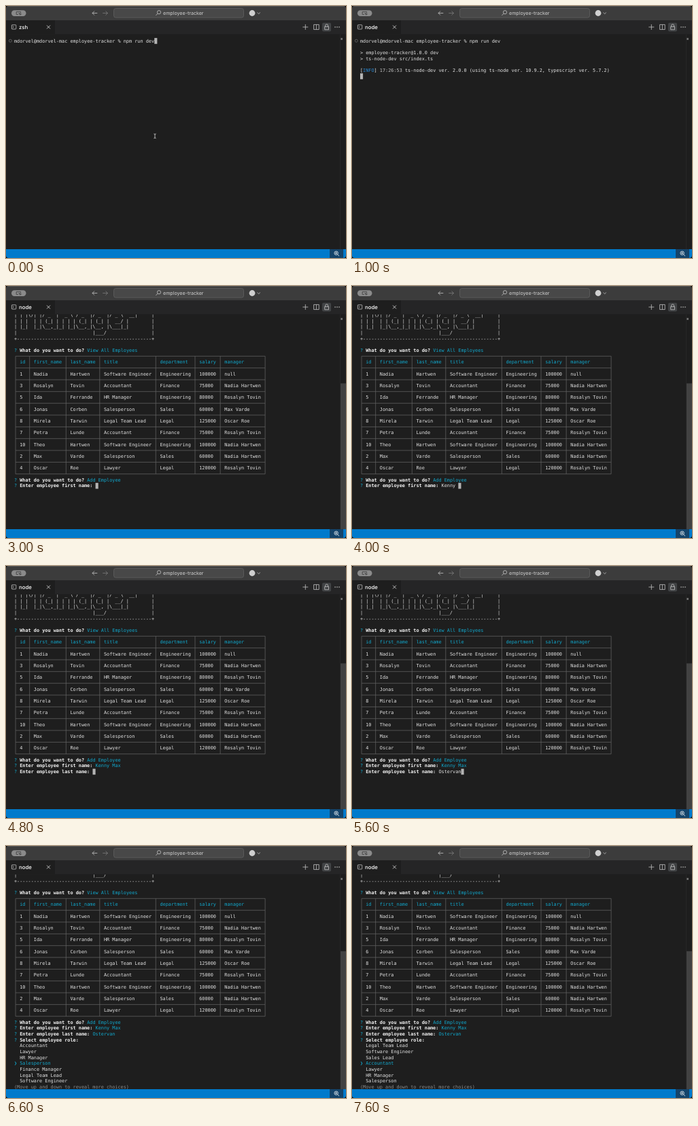
An HTML page for the animation above (8000 ms loop, 500x371 px).

```html
<!DOCTYPE html>
<html lang="en">
<head>
<meta charset="utf-8">
<title>employee-tracker</title>
<style>
  html, body { margin: 0; width: 100%; height: 100%; overflow: hidden; background: #000; }
  svg { display: block; width: 500px; height: 371px; }
  text { white-space: pre; text-rendering: geometricPrecision; }
  .ui { font-family: Inter, "Open Sans", sans-serif; }
  .line { fill: none; stroke: #c5c5c5; stroke-width: .8; }
  #term { font: 6.85px "DejaVu Sans Mono", monospace; fill: #e2e2e2; }
  #tab { font-weight: 500; }
  .bold { font-weight: bold; fill: #f2f2f2; }
  .cyan { fill: #11a8cd; }
  .blue { fill: #2a8ad6; }
  .dim { fill: #8c8c8c; }
  .time { fill: #c4c4c4; }
  .grid { fill: none; stroke: #686868; stroke-width: .7; }
</style>
</head>
<body>
<script type="text/plain" id="logo">
 _____                 _
| ____|_ __ ___  _ __ | | ___  _   _  ___  ___
|  _| | '_ ` _ \| '_ \| |/ _ \| | | |/ _ \/ _ \
| |___| | | | | | |_) | | (_) | |_| |  __/  __/
|_____|_| |_| |_| .__/|_|\___/ \__, |\___|\___|
                |_|            |___/
 __  __
|  \/  | __ _ _ __   __ _  __ _  ___ _ __
| |\/| |/ _` | '_ \ / _` |/ _` |/ _ \ '__|
| |  | | (_| | | | | (_| | (_| |  __/ |
|_|  |_|\__,_|_| |_|\__,_|\__, |\___|_|
                          |___/
</script>

<svg viewBox="0 0 500 371">
  <defs>
    <clipPath id="win"><rect width="500" height="371" rx="4"/></clipPath>
    <clipPath id="pane"><rect y="42" width="500" height="316"/></clipPath>
  </defs>
  <g clip-path="url(#win)">
    <rect width="500" height="371" fill="#1e1e1e"/>

    <!-- title bar -->
    <rect width="500" height="21" fill="#3c3c3c"/>
    <rect width="500" height=".8" fill="#5a5a5a"/>
    <rect x="8" y="6.3" width="21.5" height="8.6" rx="4.3" fill="#8b8b8b"/>
    <path class="line" style="stroke:#3c3c3c" d="M18 12.4H15.2V8.6H21.6V10.4M19 10.6L22.4 12L20.6 13.2Z"/>
    <path class="line" d="M134.3 10.5H127M130 7.5L127 10.5L130 13.5"/>
    <path class="line" style="stroke:#7c7c7c" d="M142.2 10.5H149.5M146.5 7.5L149.5 10.5L146.5 13.5"/>
    <rect x="158.5" y="3.5" width="191" height="13.6" rx="3" fill="#484848" stroke="#606060" stroke-width=".8"/>
    <circle class="line" cx="225" cy="9.2" r="2.6"/>
    <path class="line" d="M223.1 11.1L220.4 13.9"/>
    <text class="ui" x="231" y="12.8" font-size="7.1" fill="#d2d2d2">employee-tracker</text>
    <circle cx="362" cy="10.5" r="4.4" fill="#cfcfcf"/>
    <path class="line" d="M369.6 9.5L371.7 11.6L373.8 9.5"/>

    <!-- tab bar -->
    <rect y="21" width="500" height="20.5" fill="#252526"/>
    <rect y="21" width="72" height="20.5" fill="#1e1e1e"/>
    <rect class="line" x="8.4" y="27.8" width="6.4" height="6.2" rx=".6"/>
    <path class="line" d="M9.9 29.4L11.4 30.9L9.9 32.4"/>
    <text class="ui" id="tab" x="19" y="33.8" font-size="7.8" fill="#fff"></text>
    <path class="line" style="stroke:#e0e0e0" d="M60 28.5L65 33.5M65 28.5L60 33.5"/>
    <path class="line" d="M440.3 27V35M436.3 31H444.3M452.6 27.4H460.2V34.6H452.6ZM456.4 27.4V34.6"/>
    <rect x="465" y="24.8" width="13" height="12.6" rx="2" fill="#414345"/>
    <path class="line" d="M468.7 30.4H474.5V34.8H468.7ZM469.7 30.4V28.8A1.9 1.9 0 0 1 473.5 28.8V30.4"/>
    <g fill="#c5c5c5"><circle cx="484" cy="31" r=".8"/><circle cx="487" cy="31" r=".8"/><circle cx="490" cy="31" r=".8"/></g>

    <!-- terminal -->
    <g clip-path="url(#pane)">
      <path d="M491.6 42V358" stroke="#2b2b2b" stroke-width=".8"/>
      <rect x="492.4" y="47" width="2.4" height="3" fill="#777"/>
      <rect id="thumb" x="492" width="8" fill="#797979" fill-opacity=".4"/>
      <g id="term"></g>
      <path class="line" id="beam" style="stroke:#ddd" d="M217.4 188.2Q219 188.2 219 189.4V193.6Q219 194.8 217.4 194.8M220.6 188.2Q219 188.2 219 189.4M219 193.6Q219 194.8 220.6 194.8"/>
    </g>

    <!-- status bar -->
    <rect y="358" width="500" height="13" fill="#007acc"/>
    <rect x="476" y="358" width="20" height="13" fill="#14446b"/>
    <g class="line" style="stroke:#fff">
      <circle cx="485.6" cy="363.8" r="2.7"/>
      <path d="M487.6 365.8L490 368.2M484.2 363.8H487M485.6 362.4V365.2"/>
    </g>
  </g>
</svg>

<script>
const CELL = 4.124, ROW = 8.67, LEFT = 12, BASE = 53.6, ROWS = 36, LOOP = 8000;
const $ = id => document.getElementById(id);

function buildScenes() {
  const scenes = [];
  let scroll = 0;
  // Lines are lists of [text, class]; the view only ever scrolls down.
  const scene = (at, lines, cursor = false) => {
    scroll = Math.max(scroll, lines.length - ROWS);
    scenes.push({ at, lines, cursor, scroll });
  };
  const plain = s => [[s, '']];
  const ask = (label, answer = '', cls = '') => [['? ', 'cyan'], [label + ' ', 'bold'], [answer, cls]];

  // Seven rows of a looping list, with the active item at row `slot`.
  const menu = (label, items, active, slot, hint) => {
    const n = items.length;
    const out = [ask(label, hint ? '(Use arrow keys)' : '', 'dim')];
    for (let i = 0; i < 7; i++) {
      const name = items[(active - slot + i + n) % n];
      out.push(i === slot ? [['❯ ', 'cyan'], [name, 'cyan']] : plain('  ' + name));
    }
    return [...out, [['(Move up and down to reveal more choices)', 'dim']]];
  };

  const widths = [2, 10, 9, 17, 11, 6, 13];
  const table = [
    'id|first_name|last_name|title|department|salary|manager',
    '1|Nadia|Hartwen|Software Engineer|Engineering|100000|null',
    '3|Rosalyn|Tovin|Accountant|Finance|75000|Nadia Hartwen',
    '5|Ida|Ferrande|HR Manager|Engineering|80000|Rosalyn Tovin',
    '6|Jonas|Corben|Salesperson|Sales|60000|Max Varde',
    '8|Mirela|Tarwin|Legal Team Lead|Legal|125000|Oscar Roe',
    '7|Petra|Lunde|Accountant|Finance|75000|Rosalyn Tovin',
    '10|Theo|Hartwen|Software Engineer|Engineering|100000|Nadia Hartwen',
    '2|Max|Varde|Salesperson|Sales|60000|Nadia Hartwen',
    '4|Oscar|Roe|Lawyer|Legal|120000|Rosalyn Tovin'
  ].flatMap((row, r) => [
    { rule: widths },
    row.split('|').map((c, i) => [('  ' + c).padEnd(widths[i] + 3), r ? '' : 'cyan'])
  ]);
  table.push({ rule: widths, last: true });

  const edge = '+' + '-'.repeat(48) + '+';
  const art = $('logo').textContent.split('\n').slice(1, 13).map(s => '| ' + s.padEnd(47) + '|');
  const logo = [edge, ...art, edge].map(plain);

  const TODO = 'What do you want to do?', ROLE = 'Select employee role:';
  const FIRST = 'Enter employee first name:', LAST = 'Enter employee last name:';
  const todos = ['View All Employees', 'Add Employee', 'Delete Employee', 'Update Employee Role',
    'View Employees by Manager', 'Update Employee Manager', 'View Employees by Department', 'Quit'];
  const roles = ['Accountant', 'Lawyer', 'HR Manager', 'Salesperson', 'Finance Manager',
    'Legal Team Lead', 'Software Engineer', 'Sales Lead'];

  const blank = plain('');
  const prompt = [plain('mdorvel@mdorvel-mac employee-tracker % npm run dev')];
  const npm = [...prompt, blank, plain('> employee-tracker@1.0.0 dev'), plain('> ts-node-dev src/index.ts'), blank];
  const info = [...npm, [['[', ''], ['INFO', 'blue'], ['] ', ''], ['17:26:53', 'time'],
    [' ts-node-dev ver. 2.0.0 (using ts-node ver. 10.9.2, typescript ver. 5.7.2)', '']]];
  const home = [...info, blank, ...logo, blank];
  const list = [...home, ask(TODO, todos[0], 'cyan'), ...table];
  const add = [...list, ask(TODO, todos[1], 'cyan')];
  const named = [...add, ask(FIRST, 'Kenny Max', 'cyan')];
  const done = [...named, ask(LAST, 'Ostervan', 'cyan')];

  scene(0, prompt, true);
  scene(200, [...prompt, blank], true);
  scene(400, [...npm, blank], true);
  scene(1000, [...info, blank], true);
  scene(1400, [...home, blank], true);
  scene(1600, [...home, ...menu(TODO, todos, 0, 0, true)]);
  scene(1800, [...home, ...menu(TODO, todos, 1, 1)]);
  scene(2200, [...home, ...menu(TODO, todos, 0, 1)]);
  scene(2400, [...list, ...menu(TODO, todos, 0, 0, true)]);
  scene(2800, [...list, ...menu(TODO, todos, 1, 1)]);

  const type = (start, before, label, steps) =>
    steps.forEach((s, i) => scene(start + i * 200, [...before, ask(label, s)], true));
  type(3000, add, FIRST, ['', 'K', 'Ke', 'Kenn', 'Kenny', 'Kenny ']);
  type(4400, add, FIRST, ['Kenny M', 'Kenny Max']);
  type(4800, named, LAST, ['', 'Os', 'Oste', 'Osterv', 'Ostervan']);

  const pick = (at, i, slot, hint) => scene(at, [...done, ...menu(ROLE, roles, i, slot, hint)]);
  pick(5800, 0, 0, true);
  pick(6200, 1, 1);
  pick(6400, 2, 2);
  pick(6600, 3, 3);
  pick(7000, 2, 3);
  pick(7200, 1, 3);
  pick(7600, 0, 3);
  return scenes;
}

// One horizontal table rule, with the column lines down to the next rule.
function drawRule({ rule, last }, y) {
  const start = LEFT + CELL / 2;
  let x = start, stems = '';
  const stem = () => { if (!last) stems += `M${x} ${y}v${2 * ROW}`; };
  stem();
  for (const w of rule) { x += (w + 3) * CELL; stem(); }
  return `<path class="grid" d="M${start} ${y}H${x}${stems}"/>`;
}

function render({ lines, cursor, scroll }) {
  let out = '', col = 0;
  lines.forEach((line, i) => {
    const y = BASE + (i - scroll) * ROW;
    col = 0;
    if (line.rule) { out += drawRule(line, y - 2.3); return; }
    for (const [s, cls] of line) {
      if (s.trim()) {
        const pad = s.length - s.trimStart().length;
        out += `<text class="${cls}" x="${LEFT + (col + pad) * CELL}" y="${y}">${s.trim()}</text>`;
      }
      col += s.length;
    }
  });
  if (cursor) {
    const y = BASE - 6.5 + (lines.length - 1 - scroll) * ROW;
    out += `<rect x="${LEFT + col * CELL}" y="${y}" width="${CELL}" height="${ROW}" fill="#b4b4b4"/>`;
  }
  if (!scroll) out += '<circle cx="6.4" cy="51.2" r="2" fill="none" stroke="#757575" stroke-width=".7"/>';
  $('term').innerHTML = out;

  const total = scroll + ROWS, track = 316;
  $('thumb').setAttribute('y', 42 + track * scroll / total);
  $('thumb').setAttribute('height', scroll ? track * ROWS / total : 0);
}

const scenes = buildScenes();
let shown = null;
function tick() {
  const t = performance.now() % LOOP;
  const now = scenes.findLast(s => s.at <= t);
  if (now !== shown) render(shown = now);
  $('tab').textContent = t < 800 ? 'zsh' : 'node';
  $('beam').style.display = t < 200 ? '' : 'none';
  requestAnimationFrame(tick);
}
tick();
</script>
</body>
</html>
```
